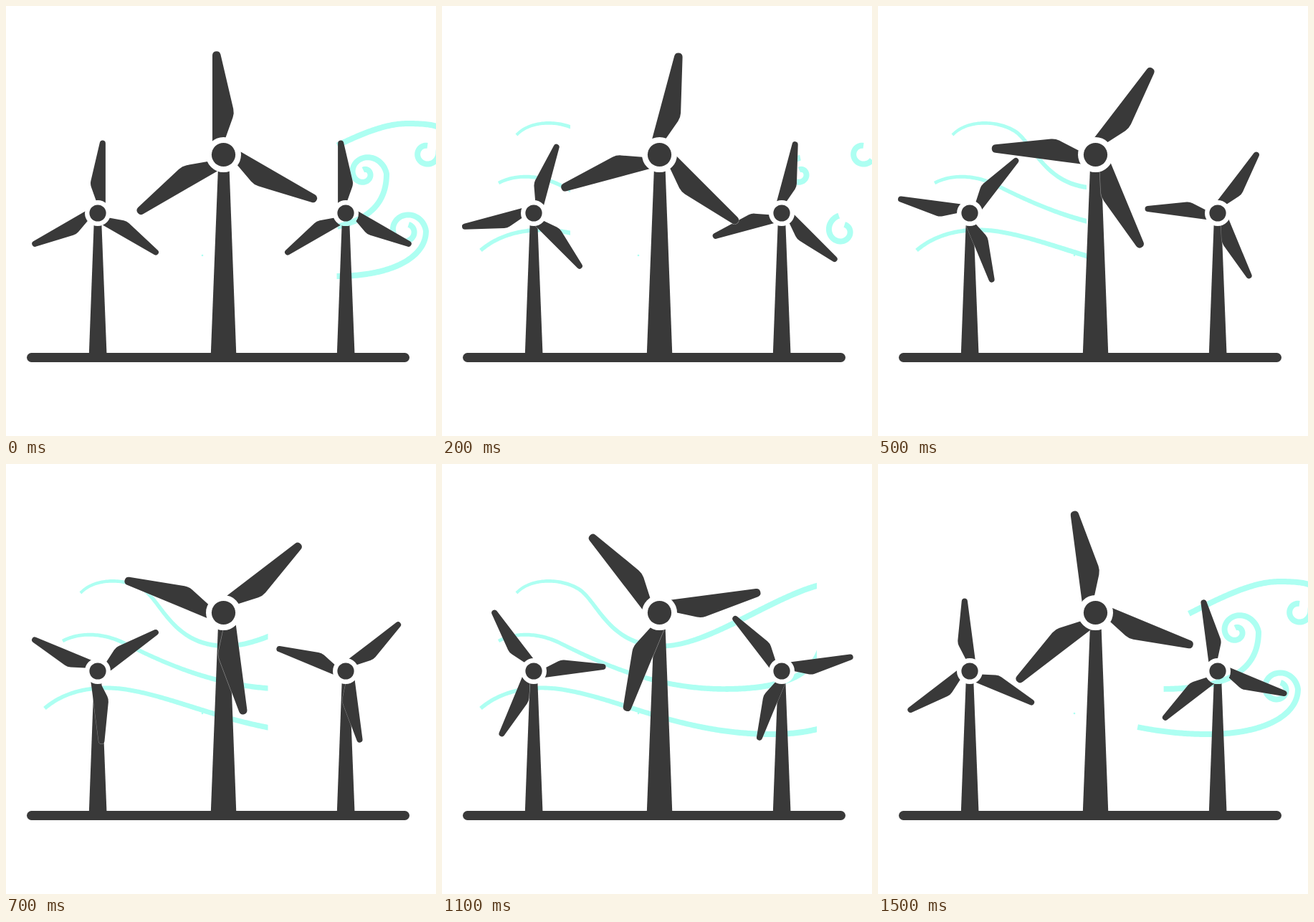
An HTML page that plays this animation: 600x600 px, repeating every 1.6 s.

```html
<!DOCTYPE html>
<html lang="en">
<head>
<meta charset="utf-8">
<title>Wind turbines</title>
<style>
  html, body { margin: 0; width: 100%; height: 100%; overflow: hidden; background: #fff; }
  svg { display: block; width: 100vw; height: 100vh; }
  .dark { fill: #393939; }
  .blade { fill: #393939; stroke: #fff; stroke-opacity: .4; stroke-width: 1.4; paint-order: stroke; }
  .wind { fill: #adfff2; }
  .lead { fill: none; }
</style>
</head>
<body>
<svg viewBox="0 0 600 600">
  <defs>
    <path id="blade" class="blade" d="M-15.5 -10V-138.5A5.8 5.8 0 0 1 -4.1 -140L13.7 -64Q15 -58 13 -52L3 -24L0 -17Z"/>
    <g id="rotor">
      <use href="#blade"/>
      <use href="#blade" transform="rotate(120)"/>
      <use href="#blade" transform="rotate(240)"/>
    </g>
    <clipPath id="reveal"><rect id="edge" width="600" height="600"/></clipPath>
    <clipPath id="gap"><circle cx="474" cy="289" r="18"/></clipPath>
  </defs>

  <path class="lead" d="M104 180C122 160 163 158 190 174S232 254 307 254S485 164 560 164S603 182 603.5 206"/>
  <path class="lead" d="M79 247C105 233 139 237 165 250C225 280 300 314 395 314S531 287 531 234"/>
  <path class="lead" d="M54 341C84 315 128 308 170 315C250 328 335 377 460 377C540 377 586 350 586 314"/>

  <g id="wind" class="wind">
    <path id="fresh" clip-path="url(#reveal)"/>
    <path id="old"/>
  </g>
  <circle class="wind" cx="274" cy="348" r="1.3"/>

  <g class="dark">
    <rect x="29" y="484" width="534" height="13" rx="6.5"/>
    <path d="M122.8 300H133.2L140.5 486H115.8Z"/>
    <path d="M468.8 300H479.2L486.5 486H461.8Z"/>
    <path d="M296 225H311.5L321.3 486H285.8Z"/>
  </g>

  <g transform="translate(128 289)">
    <use href="#rotor" class="spin" data-scale="-.703 .703" data-drift="-1.3"/>
    <circle r="18" fill="#fff"/>
    <circle r="11.6" class="dark"/>
  </g>

  <g transform="translate(474 289)">
    <use href="#rotor" class="spin" data-scale=".703" data-drift="0"/>
    <circle r="18" fill="#fff"/>
  </g>
  <g id="seen" clip-path="url(#gap)"><use href="#wind"/></g>
  <circle cx="474" cy="289" r="11.6" class="dark"/>

  <g transform="translate(303.5 207.5)">
    <use href="#rotor" class="spin" data-scale="1" data-drift="-1.3"/>
    <circle r="24.5" fill="#fff"/>
    <circle r="16.6" class="dark"/>
  </g>
</svg>

<script>
const STEP = 100, STEPS = 16, TURN = 120 / STEPS;
const QUARTER = 16;            // samples per quarter turn of a curl
const $ = id => document.getElementById(id);
const lerp = (a, b, t) => a + (b - a) * t;
const clamp = t => Math.max(0, Math.min(1, t));

// Each curl is a shrinking spiral. r: first radius, decay: shrink per quarter turn,
// turns: quarter turns, first: quarters drawn at step 13, keep: quarters gone at step 2
const curls = [
  { cx: 587, cy: 206, r: 16.5, decay: .88, turns: 3.1, dir: 1, first: .2, keep: .4 },
  { cx: 500, cy: 234, r: 31, decay: .72, turns: 5.2, dir: -1, first: 2, keep: 1 },
  { cx: 558, cy: 314, r: 28, decay: .8, turns: 4.8, dir: -1, first: 1.1, keep: 1.1 }
];

const streams = [...document.querySelectorAll('.lead')].map((lead, i) => {
  const c = curls[i], pts = [], total = lead.getTotalLength();
  const add = (x, y) =>
    pts.push({ x, y, half: lerp(4 + .75 * i, 8, clamp((x - 100) / 320)) / 2 });
  for (let s = 0; s < total; s += 2) {
    const p = lead.getPointAtLength(s);
    add(p.x, p.y);
  }
  const bend = pts.length;     // sample where the curl starts
  for (let n = 0; n <= c.turns * QUARTER; n++) {
    const q = n / QUARTER, a = c.dir * q * Math.PI / 2, r = c.r * c.decay ** q;
    add(c.cx + r * Math.cos(a), c.cy + r * Math.sin(a));
  }
  const at = q => bend + Math.round(q * QUARTER);
  return { pts, bend, last: pts.length - 1, first: at(c.first), keep: at(c.keep) };
});

function indexAt({ pts, bend }, x) {
  const i = pts.findIndex(p => p.x >= x);
  return i < 0 ? bend : Math.min(i, bend);
}

// Outline of a tapering ribbon between two samples
function ribbon({ pts, last }, from, to) {
  if (to - from < 2) return '';
  const left = [], right = [];
  for (let i = from; i <= to; i++) {
    const p = pts[i], a = pts[Math.max(0, i - 1)], b = pts[Math.min(last, i + 1)];
    const len = Math.hypot(b.x - a.x, b.y - a.y) || 1;
    const nx = (a.y - b.y) / len * p.half, ny = (b.x - a.x) / len * p.half;
    left.push(`${(p.x + nx).toFixed(2)} ${(p.y + ny).toFixed(2)}`);
    right.unshift(`${(p.x - nx).toFixed(2)} ${(p.y - ny).toFixed(2)}`);
  }
  return 'M' + left.concat(right).join('L') + 'Z';
}

// Right end of the growing streams, left end of the fading ones
const frontAt = k => 179 + 37.3 * (k - 2) + Math.max(0, k - 9) * 4.2;
const rearAt = (k, i) => Math.min(461, 183 - 10.5 * i + (125 - 12.5 * i) * (k - 13));

function fresh(s, i, k) {
  if (!k) return '';
  const from = k < 13 ? 0 : indexAt(s, rearAt(k, i));
  const to = k < 13 ? indexAt(s, frontAt(k) + 6) : k < 14 ? s.first : s.last;
  return ribbon(s, from, to);
}

function old(s, i, k) {
  if (k > 2) return '';
  return ribbon(s, Math.round(lerp(indexAt(s, rearAt(STEPS, i)), s.keep, k / 2)), s.last);
}

const spins = document.querySelectorAll('.spin');

function draw(k) {
  for (const el of spins) {
    const { drift, scale } = el.dataset;
    el.setAttribute('transform',
      `translate(${drift * k / STEPS} 0) rotate(${k * TURN}) scale(${scale})`);
  }
  $('edge').setAttribute('width', k < 13 ? frontAt(k) : 600);
  $('fresh').setAttribute('d', streams.map((s, i) => fresh(s, i, k)).join(''));
  $('old').setAttribute('d', streams.map((s, i) => old(s, i, k)).join(''));
  $('seen').style.display = k > 0 && k < 12 ? 'none' : '';
}

let shown = -1;
function tick(now) {
  const k = Math.floor(now / STEP) % STEPS;
  if (k !== shown) draw(shown = k);
  requestAnimationFrame(tick);
}
draw(0);
requestAnimationFrame(tick);
</script>
</body>
</html>
```
